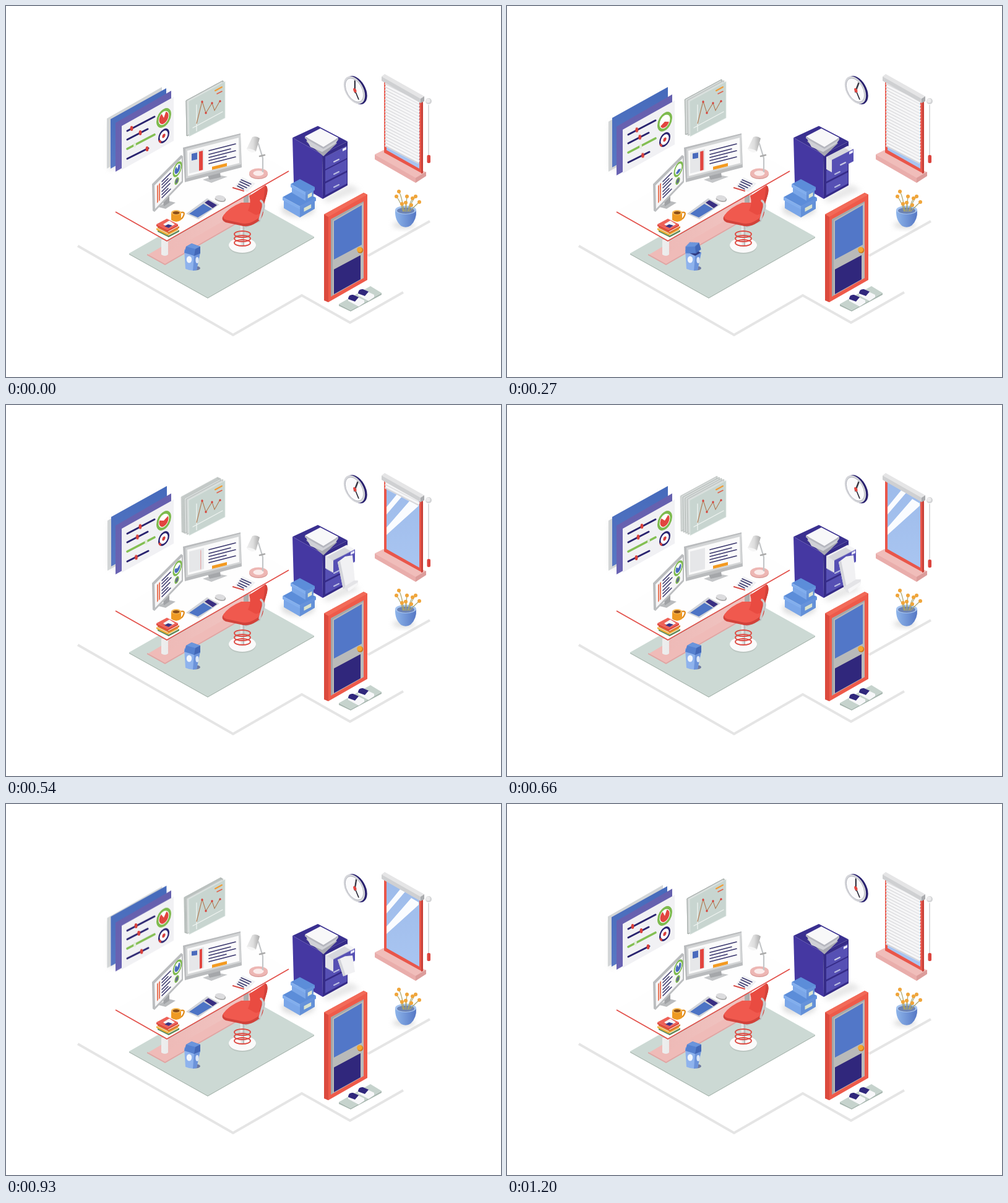
These frames come from a looping animation (800x600 px, 1230 ms). An HTML page:

```html
<!DOCTYPE html>
<html lang="en">
<head>
<meta charset="utf-8">
<title>Isometric office</title>
<style>
html, body { margin: 0; width: 100%; height: 100%; overflow: hidden; background: #fff; }
svg { display: block; width: 800px; height: 600px; }
.line { fill: none; stroke-linecap: round; }
.move { animation: 1230ms linear infinite; }

.front { animation-name: front; }
.blue { animation-name: blue; }
.back { animation-name: back; }
.knob { animation-name: knob; }
.fader { animation-name: fader; }
.pie { animation-name: pie; fill: none; }
.sheet { animation-name: sheet; }
.hand { animation-name: hand; }
.blind { animation-name: blind; }
.pull { animation-name: pull; }
.cord { animation-name: cord; transform-origin: 683px 160px; }
.drawer { animation-name: drawer; }
.paper { animation-name: paper; transform-origin: 548px 248px; }
.curl { animation-name: curl; transform-origin: 555px 292px; }
.lid { animation-name: lid; transform-origin: 302px 396px; }
.tile { animation-name: tile; transform-origin: 305px 237px; }
.bar { animation-name: bar; transform-origin: 315px 250px; }

@keyframes front { 0%, 5%, 83%, 100% { transform: none } 20%, 67% { transform: translate(0, 6px) } }
@keyframes blue { 0%, 5%, 83%, 100% { transform: none } 20%, 67% { transform: translate(1px, -2px) } }
@keyframes back { 0%, 5%, 83%, 100% { transform: none } 20%, 67% { transform: translate(1px, 5px) } }
@keyframes knob {
  0%, 97.6% { transform: none }
  22% { transform: translate(calc(var(--d) * .45), calc(var(--d) * -.24)) }
  34.2% { transform: translate(calc(var(--d) * .85), calc(var(--d) * -.45)) }
  53.7% { transform: translate(var(--d), calc(var(--d) * -.53)) }
  65.9% { transform: translate(calc(var(--d) * .75), calc(var(--d) * -.4)) }
  83% { transform: translate(calc(var(--d) * .26), calc(var(--d) * -.14)) }
}
@keyframes fader {
  0%, 100% { transform: none }
  22% { transform: translate(8px, -4px) }
  34.2% { transform: translate(16px, -8px) }
  53.7% { transform: translate(21px, -11px) }
  65.9% { transform: translate(3px, -1.5px) }
  83% { transform: translate(-2px, 1px) }
}
@keyframes pie {
  0%, 83%, 100% { stroke-dasharray: 85 15; stroke-dashoffset: 17.5 }
  22% { stroke-dasharray: 36 64; stroke-dashoffset: -7 }
  34.2% { stroke-dasharray: 55 45; stroke-dashoffset: 2.5 }
  53.7%, 65.9% { stroke-dasharray: 74 26; stroke-dashoffset: 12 }
}
@keyframes sheet {
  0%, 8%, 83%, 100% { transform: translate(-3.6px, -1px) }
  20%, 35% { transform: translate(calc(min(var(--k), 2) * -3.6px), calc(min(var(--k), 2) * -1.5px)) }
  50%, 58% { transform: translate(calc(min(var(--k), 4) * -3.6px), calc(min(var(--k), 4) * -1.7px)) }
  65.9% { transform: translate(calc(min(var(--k), 3) * -3.6px), calc(min(var(--k), 3) * -1.7px)) }
}
@keyframes hand { 0%, 5%, 84%, 100% { transform: none } 20%, 67% { transform: rotate(21deg) } }
@keyframes blind {
  0%, 24%, 93%, 100% { transform: none }
  34.2% { transform: translateY(-28px) }
  47%, 75% { transform: translateY(-112px) }
  83% { transform: translateY(-66px) }
}
@keyframes pull { 0%, 22%, 70%, 100% { transform: none } 34.2% { transform: translateY(5px) } 47%, 56% { transform: translateY(9px) } 65.9% { transform: translateY(2px) } }
@keyframes cord { 0%, 22%, 70%, 100% { transform: none } 34.2% { transform: scaleY(1.06) } 47%, 56% { transform: scaleY(1.11) } 65.9% { transform: scaleY(1.02) } }
@keyframes drawer {
  0%, 7%, 93%, 100% { transform: none }
  22%, 83% { transform: translate(9px, 5px) }
  31%, 77% { transform: translate(13px, 7.4px) }
}
@keyframes paper { 0%, 26%, 80%, 100% { transform: scaleY(0) } 34.2%, 73% { transform: none } }
@keyframes curl { 0%, 35%, 72%, 100% { transform: scale(0) } 46%, 67% { transform: none } }
@keyframes lid { 0%, 11%, 32%, 100% { transform: none } 20%, 23% { transform: translate(-1px, -3px) rotate(-17deg) } }
@keyframes tile { 0%, 18%, 83%, 100% { transform: none } 22% { transform: scaleY(.8) } 34.2%, 65.9% { transform: scaleY(.2) } 42%, 58% { transform: scaleY(0) } }
@keyframes bar { 0%, 18%, 83%, 100% { transform: none } 34.2% { transform: scaleX(.7) } 46%, 58% { transform: scaleX(0) } 65.9% { transform: scaleX(.28) } }
</style>
</head>
<body>
<svg viewBox="0 0 800 600">
<defs>
  <filter id="soft" x="-40%" y="-40%" width="180%" height="180%"><feGaussianBlur stdDeviation="4"/></filter>
  <linearGradient id="tube"><stop stop-color="#eee"/><stop offset=".5" stop-color="#ddd"/><stop offset="1" stop-color="#aaa"/></linearGradient>
  <linearGradient id="glass" x2="0" y2="1"><stop stop-color="#9dbbea"/><stop offset="1" stop-color="#a9c5f1"/></linearGradient>
  <linearGradient id="pot"><stop stop-color="#8db4ea"/><stop offset="1" stop-color="#5577c4"/></linearGradient>
  <linearGradient id="azure" x2="0" y2="1"><stop stop-color="#456abb"/><stop offset="1" stop-color="#5878c4"/></linearGradient>
  <linearGradient id="violet" x2="0" y2="1"><stop stop-color="#6560ae"/><stop offset="1" stop-color="#6a63b3"/></linearGradient>
  <linearGradient id="panel" x1="1" x2="0"><stop stop-color="#f0c6c3"/><stop offset="1" stop-color="#eebab7"/></linearGradient>
  <clipPath id="pane"><path d="M610 122 672 154V270L610 238Z"/></clipPath>
  <clipPath id="slot"><path d="M516 244 551 226 566 234V254L530 273 516 265Z"/></clipPath>
</defs>

<!-- floor and rug -->
<path d="M116 388 367 532 478 468 556 512 642 463M585 404 685 348" fill="none" stroke="#e5e5e5" stroke-width="4"/>
<path d="M199 400 326 471 498 373V375L326 473 199 402Z" fill="#b0beb7"/>
<path d="M199 400 371 302 498 373 326 471Z" fill="#ccd9d4"/>

<!-- wall panels -->
<path d="M167 190 252 141V212L167 266Z" fill="#ccc" filter="url(#soft)" opacity=".6"/>
<path class="move back" d="M163 182 252 131V212L163 263Z" fill="#d3d6d7"/>
<path class="move blue" d="M169 183 259 133V213L169 263Z" fill="url(#azure)"/>
<path class="move front" d="M177 189 267 137V217L177 268Z" fill="url(#violet)"/>
<g class="move front">
  <path d="M187 194 271 147V218L187 265Z" fill="#f1f1f4"/>
  <g class="line" stroke="#29236f" stroke-width="3">
    <path d="M196 202 240 179M196 216 229 199M196 247 230 230"/>
    <path d="M196 231 240 208" stroke="#83bf52" stroke-width="3.6"/>
  </g>
  <g fill="#d8403b">
    <ellipse class="move knob" style="--d:15px" cx="203" cy="198" rx="2.4" ry="4"/>
    <ellipse class="move knob" style="--d:-5px" cx="217" cy="205" rx="2.4" ry="4"/>
    <ellipse class="move knob" style="--d:-19px" cx="228" cy="231" rx="2.4" ry="4"/>
    <ellipse class="move fader" cx="208" cy="225" rx="2" ry="4.2" fill="#e3eddb"/>
  </g>
  <g transform="matrix(.82 -.43 0 1 255 181)">
    <circle r="12.5" fill="#fff" stroke="#7dba4d" stroke-width="4.2"/>
    <circle class="move pie" r="4.6" pathLength="100" stroke="#e2453f" stroke-width="9.2"/>
  </g>
  <g transform="matrix(.82 -.43 0 1 255 210)">
    <circle r="9.5" fill="#fff" stroke="#29236f" stroke-width="3"/>
    <circle r="3.2" fill="#d8403b"/>
    <path d="M-9 3Q-8 7-5 8" fill="none" stroke="#d8403b" stroke-width="3"/>
  </g>
</g>

<!-- chart sheets -->
<g id="sheets" fill="#dadedd" stroke="#a3aba8" stroke-width=".9"></g>
<path d="M295 154 354 122V181L296 211Z" fill="#c8d5d0" stroke="#dfe7e4" stroke-width=".8"/>
<g class="line">
  <path d="M308 160V202M302 197 350 171" stroke="#eff4f1" stroke-width="1.3"/>
  <path d="M308 190 317 154 323 173 333 157 337 169 346 153" stroke="#b07a52" stroke-width="1.1"/>
  <path d="M338 137 349 131" stroke="#f09b35" stroke-width="2"/>
  <path d="M341 142 349 138" stroke="#e0604a" stroke-width="1.6"/>
  <path d="M317 155h0M323 173h0M333 157h0M346 154h0" stroke="#d8403b" stroke-width="3.4"/>
</g>

<!-- desk -->
<path d="M228 403 257 419 396 339V303L262 381 250 390Z" fill="#efbbb8"/>
<path d="M257 419 396 339V337L257 417 228 401V403Z" fill="#dfa5a3"/>
<path d="M262 381 396 304V322L262 399Z" fill="url(#panel)"/>
<path d="M251 378h11v24q-5 4-11 0ZM384 306h8v16h-8Z" fill="url(#tube)"/>
<path d="M177 332 375 219 457 267 260 379Z" fill="#fefefe"/>
<path d="M177 333 260 380 457 267" fill="none" stroke="#e2504a" stroke-width="1.8"/>

<!-- wide screen -->
<path d="M318 281 341 273 358 276 332 286Z" fill="#c4c6c8"/>
<path d="M326 274 346 269 347 277 329 281Z" fill="#a5a7aa"/>
<path d="M286 229 379 206 381 261 289 285Z" fill="#b9bbbd"/>
<path d="M290 231 379 208 380 256 291 279Z" fill="#d3d5d6"/>
<path d="M293 234 376 213 377 254 294 275Z" fill="#fafafa"/>
<path d="M296 237 320 231 320 265 296 271Z" fill="#e6e7e9"/>
<path class="move tile" d="M300 239 309 237V248L300 250Z" fill="#4a6bbd"/>
<path class="move bar" d="M312 235.500 318 234V265L312 266.500Z" fill="#e2453f"/>
<path class="line" d="M328 234 371 223M328 240 363 231M328 245 371 234M328 250 356 243M328 255 371 244" stroke="#39366d" stroke-width="1.6"/>
<path d="M333 260 357 254V259L333 265Z" fill="#f39a21"/>

<!-- narrow screen -->
<path d="M246 325 262 315 274 318 258 328Z" fill="#b9bbbd"/>
<path d="M254 315 264 306V318L255 324Z" fill="#a0a2a5"/>
<path d="M236 288 283 241 286 243V285L240 333 237 331Z" fill="#bbbdbf"/>
<path d="M240 290 284 246V283L241 328Z" fill="#f6f6f7"/>
<path d="M244 291 246 289V317L244 319ZM247 288 249 286V314L247 316Z" fill="#e9785b"/>
<g class="line" stroke="#39366d" stroke-width="1.5">
  <path d="M252 284 266 270M252 289 262 279M252 294 267 279M252 300 265 287M252 305 262 295M252 310 266 296"/>
</g>
<g transform="matrix(.68 -.6 0 1 277 264)">
  <circle r="9.500" fill="#fff" stroke="#7dba4d" stroke-width="3"/>
  <circle class="move pie" r="3.300" pathLength="100" stroke="#4a6bbd" stroke-width="6.6"/>
</g>
<g transform="matrix(.68 -.6 0 1 276 283)"><circle r="4.300" fill="#65698e" stroke="#7dba4d" stroke-width="2"/></g>

<!-- lamp -->
<ellipse cx="408" cy="272" rx="15" ry="8" fill="#d99d9a"/>
<ellipse cx="408" cy="270.500" rx="15" ry="8" fill="#edb6b3"/>
<ellipse cx="408" cy="270.500" rx="8.500" ry="4.200" fill="#fbeceb"/>
<path class="line" d="M415 268V246L408 223" stroke="#c3c6c8" stroke-width="2.2"/>
<path class="line" d="M410 243 418 241" stroke="#aaa" stroke-width="2.6"/>
<path d="M398 212Q404 209 410 214L404 235Q396 239 389 231Z" fill="url(#tube)"/>
<path d="M389 231Q396 230 404 235 396 240 389 231Z" fill="#f6f6f6"/>

<!-- desk things -->
<g id="books"></g>
<path d="M254 353 264 347 273 353 263 359Z" fill="#f6f6fa"/>
<path d="M256 356 262 353 269 355 263 359Z" fill="#3a3482"/>
<path d="M282 334q8-2 5 5t-6 5" fill="none" stroke="#e08b1b" stroke-width="2.200"/>
<path d="M267 334V346Q275 352 283 346V334Z" fill="#ee9a24"/>
<ellipse cx="275" cy="334" rx="8" ry="4" fill="#f8bb55"/><ellipse cx="275" cy="334.500" rx="5.500" ry="2.500" fill="#8c4f18"/>
<path d="M291 336 325 311 345 321 311 345Z" fill="#d2d4d8"/>
<path d="M296 336 319 320 333 328 310 342Z" fill="#4d74c5"/>
<path d="M321 318 327 314 341 322 334 327Z" fill="#392f82"/>
<path d="M338 313q-2-4 5-6 9-1 12 5 1 5-6 5-5 0-11-4Z" fill="#aaa"/>
<path d="M338 311q-1-4 5-5 9 0 11 5 0 5-6 4-5 0-10-4Z" fill="#dcdcde"/>
<path d="M370 291 382 277 403 287 390 301Z" fill="#f0f1f3"/>
<path class="line" d="M380 281 396 288M378 284 393 291M376 288 389 294M374 291 384 296" stroke="#39366d" stroke-width="1.500"/>
<path class="line" d="M367 294 384 299" stroke="#d8504b" stroke-width="2.200"/>

<!-- chair -->
<ellipse cx="382" cy="389" rx="22" ry="12" fill="#bcc7c2"/>
<ellipse cx="382" cy="387" rx="22" ry="12" fill="#fafafa"/>
<path d="M379 352h6v36q-3 2-6 0Z" fill="url(#tube)"/>
<g fill="none" stroke="#de4a42" stroke-width="1.8"><ellipse cx="382" cy="369" rx="13" ry="5"/><ellipse cx="382" cy="376" rx="13" ry="5"/><ellipse cx="382" cy="383" rx="13" ry="5"/></g>
<path class="line" d="M413 317Q419 320 415 330L409 347 388 356" stroke="#b8bbbd" stroke-width="4"/>
<path d="M350 341Q359 327 380 319L398 319 416 333Q415 344 405 350 392 359 379 355L355 350Q348 347 350 341Z" fill="#d2423a"/>
<path d="M351 339Q360 326 380 318L398 318 415 332Q413 341 402 347 391 354 379 351L356 346Q350 344 351 339Z" fill="#f0594e"/>
<path d="M393 307Q405 300 419 290 424 292 422 303L414 331Q407 341 400 336L391 331Q397 319 393 307Z" fill="#e94b41"/>
<path d="M419 290Q424 292 422 303L414 331 409 337 417 308Z" fill="#d2423a"/>
<path class="line" d="M412 315Q418 319 414 330L410 345" stroke="#c9ccce" stroke-width="3.500"/>

<!-- bin -->
<ellipse cx="306" cy="424" rx="8" ry="3.500" fill="#46508a" opacity=".7"/>
<path d="M288 394 302 391 314 399 308 427Q298 429 290 425Z" fill="#8fb3ed"/>
<path d="M304 403 314 398 308 427 302 428Z" fill="#6c93da"/>
<path d="M289 397 300 391 313 399 304 404Z" fill="#2f3a80"/>
<ellipse cx="296" cy="410" rx="4.200" ry="5.500" fill="#f2f6fc"/><ellipse cx="309" cy="411" rx="2.600" ry="5" fill="#dce6f6"/>
<g class="move lid"><path d="M288 399 291 389 300 384 314 389 314 400 304 404Z" fill="#5681d0"/><path d="M291 389 300 384 314 389 306 393Z" fill="#6b95dc"/><path d="M306 393 314 389 314 400 304 404Z" fill="#4368b8"/></g>

<!-- filing cabinet -->
<path d="M466 284 512 312 556 289 572 298 520 318Z" fill="#ccc" filter="url(#soft)" opacity=".5"/>
<path d="M463 213 504 194 552 219 511 240Z" fill="#3a3090"/>
<path d="M463 213 511 240 512 312 465 285Z" fill="#4538a2"/>
<path d="M511 240 552 219V290L512 312Z" fill="#352b88"/>
<g fill="#5650b4"><path d="M516 266 551 248V266L516 284ZM516 287 551 269V287L516 306Z"/></g>
<path d="M516 244 551 226V246L516 264Z" fill="#292070"/>
<g clip-path="url(#slot)">
  <g class="move drawer">
    <path d="M498 234 533 216 551 226 516 244Z" fill="#f4f4f6"/>
    <path d="M504 239 534 223 546 230 516 244Z" fill="#d6d7dd"/>
    <path d="M498 234 516 244V264L498 254Z" fill="#e3e4e8"/>
    <path d="M516 244 551 226V246L516 264Z" fill="#5650b4"/>
    <path class="line" d="M530 252 538 248" stroke="#cfd0e6" stroke-width="2"/>
    <path d="M544 231 550 228V232L544 235Z" fill="#eef"/>
  </g>
</g>
<path class="line" d="M530 272 538 268M530 293 538 289" stroke="#b9bce0" stroke-width="2"/>
<g class="move paper"><path d="M536 254 548 245 560 243 564 286 545 298Z" fill="#f1f1f3"/><path d="M536 254 540 252 549 295 545 298Z" fill="#d4d5da"/></g>
<g class="move curl"><path d="M545 294 564 282 572 282 571 291 553 304Q546 303 545 294Z" fill="#e4e4e7"/><path d="M551 298 571 286V291L553 304Z" fill="#f7f7f8"/></g>
<path d="M485 219 511 205 535 222 513 243Z" fill="#a8a9b2"/>
<path d="M485 215 509 202 537 216 532 223 511 236 492 228Z" fill="#d0d1d6"/>
<path d="M483 211 508 198 537 213 513 228Z" fill="#f8f8f9"/>
<path d="M483 211 513 228 537 213V216L513 231 483 214Z" fill="#b6b7bf"/>

<!-- boxes -->
<ellipse cx="472" cy="329" rx="27" ry="12" fill="#bbb" opacity=".5" filter="url(#soft)"/>
<g id="boxes"></g>

<!-- clock -->
<g transform="matrix(.84 .44 0 1 566 136)"><circle r="21" fill="#29216f"/></g>
<g transform="matrix(.84 .44 0 1 563 136)">
  <circle r="20.500" fill="#d5d6da"/><circle r="17.500" fill="#fbfbfc" stroke="#aaabb5" stroke-width=".8"/>
  <g transform="translate(1 0)">
    <path class="line" d="M0 0 7 11" stroke="#282735" stroke-width="2.200"/>
    <path class="line move hand" d="M0 3V-15" stroke="#282735" stroke-width="2.400"/>
    <circle r="3.200" fill="#e2453f"/>
  </g>
</g>

<!-- window -->
<path d="M596 240 610 233 679 269 662 279Z" fill="#f0bdba"/>
<path d="M596 240 662 278V286L596 248Z" fill="#e9adab"/><path d="M662 278 679 268V275L662 286Z" fill="#dc9d9b"/>
<path d="M611 118 673 152V271L611 237Z" fill="#e9564a"/>
<path d="M671 153 674 151V270L671 271Z" fill="#c8423a"/>
<path d="M615 124 668 153V263L615 233Z" fill="url(#glass)"/>
<path d="M615 165 637 138 645 142 615 177ZM615 198 655 152 667 159V163L615 210Z" fill="#fafcff"/>
<g clip-path="url(#pane)"><g id="blind" class="move blind"></g></g>
<path d="M607 114 612 110 676 146 670 151Z" fill="#e5e5e6"/>
<path d="M607 114 670 150V157L607 121Z" fill="#cfd0d2"/><path d="M670 150 676 146V154L670 157Z" fill="#aaacaf"/>
<path class="move cord" d="M683 160V243" stroke="#dcdcde" stroke-width="2"/>
<circle cx="683" cy="154" r="5" fill="#d3d4d6"/><circle cx="682" cy="153" r="3.500" fill="#ececed"/>
<rect class="move pull" x="680.500" y="241" width="5.500" height="13" rx="2" fill="#dc453e"/>

<!-- plant -->
<ellipse cx="643" cy="354" rx="18" ry="6" fill="#bbb" filter="url(#soft)" opacity=".5"/>
<path d="M629 330Q628 347 639 356 647 360 654 355 664 346 663 330Z" fill="url(#pot)"/>
<ellipse cx="646" cy="330" rx="17" ry="7" fill="#a5c4f0"/><ellipse cx="646" cy="331" rx="14" ry="5" fill="#6c83b4"/>
<g id="plant" class="line"></g>

<!-- door -->
<path d="M514 337 578 302 584 305V443L521 479 514 476Z" fill="#ee5a4a"/>
<path d="M514 337 521 341V479L514 476Z" fill="#dc4a3e"/>
<path d="M514 337 578 302 584 305 521 341Z" fill="#f26a58"/>
<path d="M525 345 578 316V440L525 470Z" fill="#b9bab9"/>
<path d="M525 345 578 316V318L528 347V468L525 470Z" fill="#a3a6a8"/>
<path d="M530 348 575 322V386L530 410Z" fill="#5277c8"/>
<path d="M530 426 573 403V442L530 466Z" fill="#30277c"/>
<circle cx="572.500" cy="395" r="4.800" fill="#c9781a"/><circle cx="571.500" cy="394" r="4.300" fill="#f3a72f"/>

<!-- mat and slippers -->
<path d="M538 482 557 492 607 464V467L557 494 538 485Z" fill="#a9b8b1"/>
<path d="M538 482 589 453 607 464 557 492Z" fill="#c6d3cd"/>
<g id="slippers"></g>
</svg>
<script>
const put = (id, html) => { document.getElementById(id).innerHTML = html; };
const repeat = (n, f) => Array.from({ length: n }, (_, i) => f(i)).join('');
const path = (d, fill) => `<path d="${d}" fill="${fill}"/>`;

put('sheets', repeat(4, i =>
  `<path class="move sheet" style="--k:${4 - i}" d="M295 154 354 122V181L296 211Z"/>`));

put('blind', repeat(21, i => {
  const y = 122 + i * 5;
  return path(`M614 ${y}l55 28-3 5-54-28z`, '#f6f6f7') +
    `<path d="M612.5 ${y + 4}l54 28" stroke="#d0d0d4" stroke-width="1.5"/>`;
}));

// Stacked books, alternately shifted sideways
put('books', ['#5f8a5a', '#eeb039', '#dd7530', '#df4540'].map((c, i) => {
  const x = 245 - i % 2 * 2, y = 362 - i * 3;
  return path(`M${x} ${y}l18 9 17-9v3l-17 9-18-9z`, c) + path(`M${x} ${y}l17-9 18 9-17 9z`, i === 3 ? '#ee6157' : '#f4e6d0');
}).join(''));

// Isometric carton: left corner, left run, right run, height
function carton(x, y, a, b, h) {
  const face = (dx, dy, run, rise, t, c) => path(`M${x + dx} ${y + dy}l${run} ${rise}v${t}l${-run} ${-rise}z`, c);
  const s = a * .54, r = -b * .54;
  return face(2, 2, a - 2, s, h, '#7aa6e8') + face(a, s, b - 2, r, h + 2, '#6390d8') +
    path(`M${x} ${y}l${b} ${r} ${a} ${s} ${-b} ${-r}z`, '#5c8dd9') +
    face(0, 0, a, s, 5, '#82aeed') + face(a, s, b, r, 5, '#6693db') +
    face(a + b * .25, s + 6 - b * .13, b * .45, r * .45, 6, '#d9e3cf');
}
put('boxes', carton(447, 309, 28, 26, 16) + carton(460, 288, 24, 15, 12));

const blooms = [[635, 300], [631, 308], [646, 318], [648, 308], [657, 311], [662, 308], [668, 317], [640, 320], [655, 322]];
put('plant',
  blooms.map(([x, y]) => `<path d="M${x} ${y}Q${(x + 646) / 2} ${y + 10} ${646 + (x - 646) * .3} 332" stroke="#a9a36a" stroke-width="1.2"/>`).join('') +
  blooms.map(([x, y]) => `<circle cx="${x}" cy="${y}" r="3" fill="#f0a53a"/>`).join(''));

put('slippers', [[553, 472], [569, 463]].map(([x, y]) =>
  path(`M${x} ${y}l7-5 19 9v4l-9 6-17-9z`, '#f7f7f9') +
  path(`M${x} ${y + 1}q1-7 8-6l9 4-6 7-11-4z`, '#30277c')).join(''));
</script>
</body>
</html>
```
